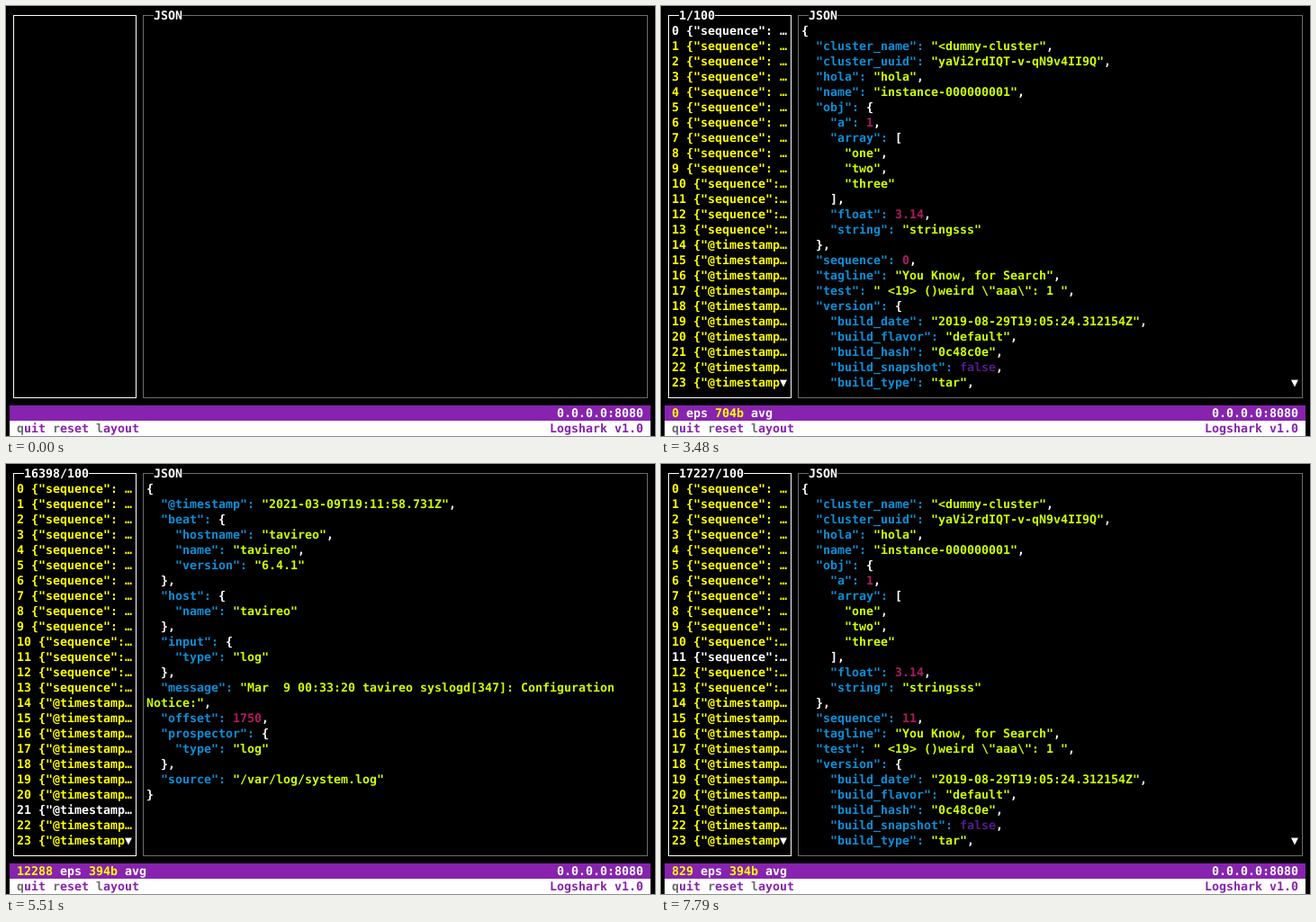
Animation, 721 px wide and 478 px high, one loop 8 s. Source, as an HTML page with a canvas:

```html
<!DOCTYPE html>
<html lang="en">
<head>
<meta charset="utf-8">
<title>Log viewer</title>
<style>
  html, body { margin: 0; width: 100%; height: 100%; overflow: hidden; background: #000; }
  canvas { display: block; }
</style>
</head>
<body>
<canvas id="screen" width="721" height="478"></canvas>
<script>
const ctx = document.getElementById('screen').getContext('2d');
const LOOP = 8000, REFRESH = 120, CELL = 8, ROW = 17, LAST_ROW = 24;
const JSON_COL = 19, RIGHT_COL = 88;
const WHITE = '#fff', YELLOW = '#ff0', PURPLE = '#8723ae', GRAY = '#6c6c6c';
const KEY = '#0a8fd8', STRING = '#ceff00', NUMBER = '#ae1a5f', BOOL = '#551a8b';
const HOST = 'tavireo';

// Events start to fill the list at this refresh; the counters are polled about once a second.
const FIRST_EVENT = 24, FIRST_POLL = 7.05, POLL = 8.47;
const rates = [0, 0, 0, 4109, 12288, 0, 829];

// The cursor glides between these [refresh, selected event] points.
const cursor = [
  [32, 0], [35, 2], [37, 6], [39, 6], [46, 21],
  [50, 21], [55, 17], [56, 17], [59, 14], [65, 11]
];

function selectedAt(refresh) {
  const next = cursor.findIndex(([at]) => at > refresh);
  if (next < 1) return cursor.at(next)[1];
  const [[t0, a], [t1, b]] = cursor.slice(next - 1, next + 1);
  return Math.round(a + (b - a) * (refresh - t0) / (t1 - t0));
}

function statsAt(refresh, listed) {
  const poll = Math.floor((refresh - FIRST_POLL) / POLL);
  if (poll < 0) return null;
  const total = rates.slice(0, poll + 1).reduce((sum, rate) => sum + rate, Math.min(listed, 1));
  return { total, rate: rates[poll], average: total > 1 ? 394 : total * 704 };
}

const clusterEvent = sequence => ({
  cluster_name: '<dummy-cluster',
  cluster_uuid: 'yaVi2rdIQT-v-qN9v4II9Q',
  hola: 'hola',
  name: 'instance-000000001',
  obj: { a: 1, array: ['one', 'two', 'three'], float: 3.14, string: 'stringsss' },
  sequence,
  tagline: 'You Know, for Search',
  test: ' <19> ()weird "aaa": 1 ',
  version: {
    build_date: '2019-08-29T19:05:24.312154Z',
    build_flavor: 'default',
    build_hash: '0c48c0e',
    build_snapshot: false,
    build_type: 'tar',
    number: '7.3.2'
  }
});

function logEvent(i) {
  const disk = i < 18;
  return {
    '@timestamp': '2021-03-09T19:11:58.731Z',
    beat: { hostname: HOST, name: HOST, version: '6.4.1' },
    host: { name: HOST },
    input: { type: 'log' },
    message: disk ? '/dev/rdisk2s1: ** Checking volume.'
                  : `Mar  9 00:33:20 ${HOST} syslogd[347]: Configuration Notice:`,
    offset: disk ? 1005 - (17 - i) * 35 : 1750 - (21 - i) * 149,
    prospector: { type: 'log' },
    source: disk ? '/var/log/fsck_apfs.log' : '/var/log/system.log'
  };
}

function put(text, col, row, color) {
  ctx.fillStyle = color;
  ctx.fillText(text, 4 + col * CELL, 15 + row * ROW);
  return col + text.length;
}

function rect(x, y, w, h, color) {
  ctx.fillStyle = color;
  ctx.fillRect(x, y, w, h);
}

function panel(x, width, color, title) {
  ctx.strokeStyle = color;
  ctx.strokeRect(x + .5, 10.5, width, 425);
  if (!title) return;
  const col = (x + 8) / CELL;
  rect(4 + col * CELL, 2, title.length * CELL, ROW, '#000');
  put(title, col, 0, WHITE);
}

function tokenColor(token) {
  if (/^".*":$/.test(token)) return KEY;
  if (token[0] === '"') return STRING;
  if (/^[\d-]/.test(token)) return NUMBER;
  return /^(true|false)/.test(token) ? BOOL : WHITE;
}

function drawJson(event) {
  const tokens = /"(?:\\.|[^"\\])*":?|[\d.-]+|true|false|[{}[\],]+|\s+/g;
  let row = 1;
  for (const line of JSON.stringify(event, null, 2).split('\n')) {
    if (row > LAST_ROW) return put('▼', RIGHT_COL - 1, LAST_ROW, WHITE);
    let col = JSON_COL;
    for (const token of line.match(tokens)) {
      for (const word of token.match(/\s+|\S+/g)) {
        if (col + word.length > RIGHT_COL) { col = JSON_COL; row++; }
        col = put(word, col, row, tokenColor(token));
      }
    }
    row++;
  }
}

function drawList(listed, selected) {
  for (let i = 0; i < Math.min(listed, LAST_ROW); i++) {
    const label = `${i} {"${i < 14 ? 'sequence": ' : '@timestamp": '}`.slice(0, 15);
    const color = i === selected ? WHITE : YELLOW;
    const more = i === LAST_ROW - 1 && listed > LAST_ROW;
    put(label, 1, i + 1, color);
    put(more ? '▼' : '…', 16, i + 1, more ? WHITE : color);
  }
}

function drawFooter(stats) {
  rect(4, 444, 712, ROW, PURPLE);
  rect(4, 461, 712, ROW, WHITE);
  if (stats) {
    let col = put(`${stats.rate}`, 1, 26, YELLOW);
    col = put('eps', col + 1, 26, WHITE);
    col = put(`${stats.average}b`, col + 1, 26, YELLOW);
    put('avg', col + 1, 26, WHITE);
  }
  put('0.0.0.0:8080', 76, 26, WHITE);
  let col = 1;
  for (const word of ['quit', 'reset', 'layout']) {
    put(word[0], col, 27, GRAY);
    col = put(word.slice(1), col + 1, 27, PURPLE) + 1;
  }
  put('Logshark v1.0', 75, 27, PURPLE);
}

function draw(time) {
  const refresh = Math.floor((time + 10) / REFRESH);
  const listed = refresh < FIRST_EVENT ? 0 : Math.min(100, 1 + (refresh - FIRST_EVENT) * 5);
  const selected = selectedAt(refresh);
  const stats = statsAt(refresh, listed);
  rect(0, 0, 721, 478, '#000');
  panel(8, 136, WHITE, stats && `${stats.total}/100`);
  panel(152, 560, GRAY, 'JSON');
  drawList(listed, selected);
  if (listed) drawJson(selected < 14 ? clusterEvent(selected) : logEvent(selected));
  drawFooter(stats);
}

ctx.font = 'bold 13.29px "DejaVu Sans Mono", monospace';
ctx.textRendering = 'geometricPrecision';

function animate() {
  draw(performance.now() % LOOP);
  requestAnimationFrame(animate);
}
animate();
</script>
</body>
</html>
```
